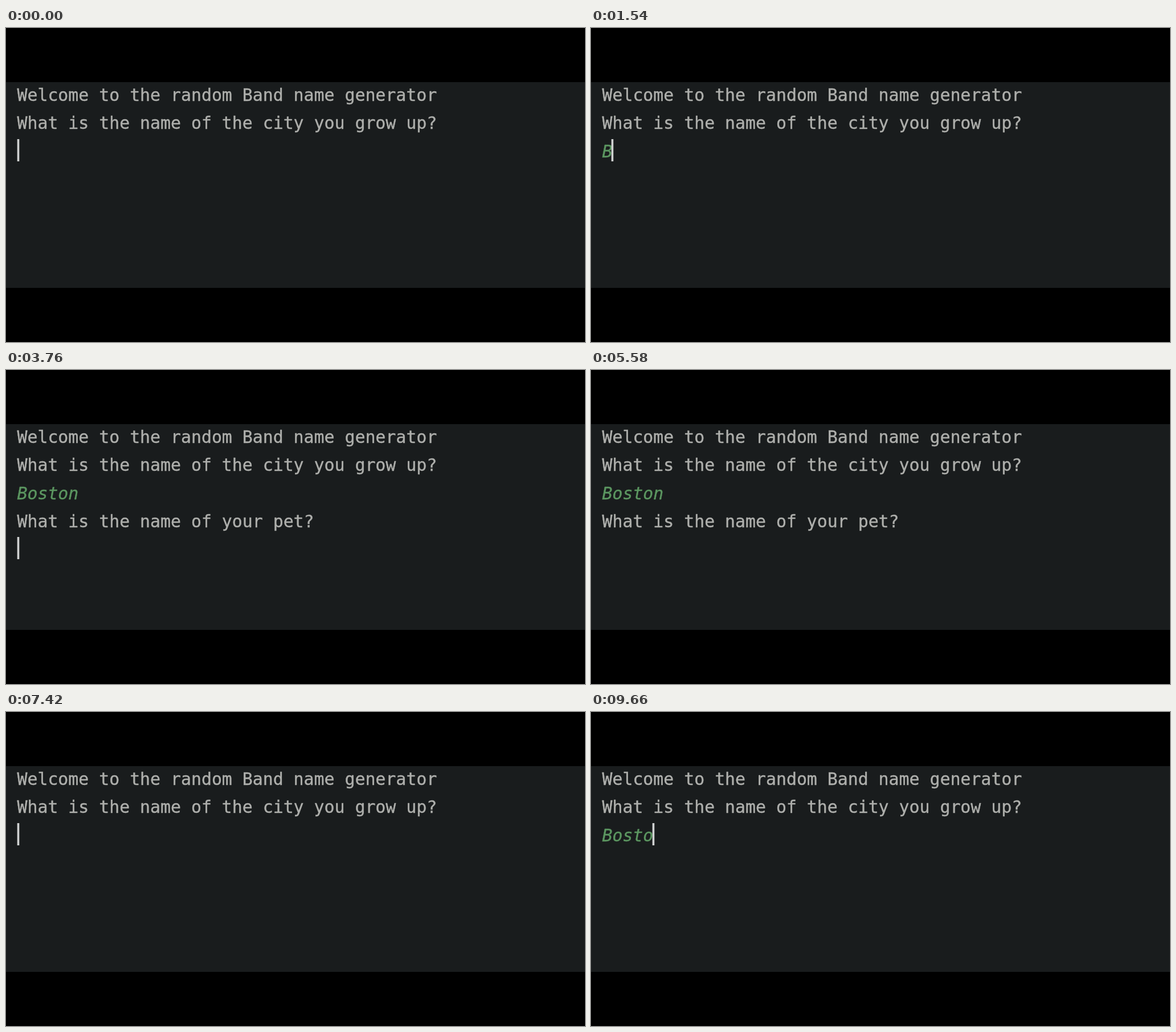
Recreate the animation shown at these times as an HTML page with a canvas. Size 1016 by 551 pixels, loop 9.68 s.

```html
<!DOCTYPE html>
<html lang="en">
<head>
<meta charset="utf-8">
<title>Band name generator</title>
<style>
html, body { margin: 0; width: 100%; height: 100%; overflow: hidden; background: #000; }
canvas { display: block; }
</style>
</head>
<body>
<canvas id="stage" width="1016" height="551"></canvas>
<script>
const ctx = document.getElementById('stage').getContext('2d');

const LOOP = 9680;
const RESTART = 6960;   // the session starts over within the loop
const BLINK = 530;
const LEFT = 20, ADVANCE = 18, FIRST_BASELINE = 128, LINE_HEIGHT = 49.3;
const FONT = '29.85px "DejaVu Sans Mono", "Noto Sans Mono", monospace';
const COLORS = { panel: '#191c1d', output: '#aeafac', input: '#5b9660', caret: '#d0d2d2' };

const CITY = 'Boston';
const KEY_TIMES = [1400, 1840, 2140, 2420, 2660, 2900];
const ENTER = 3560;

function writeLine(text, row, typed = false) {
  const y = Math.round(FIRST_BASELINE + row * LINE_HEIGHT);
  ctx.font = (typed ? 'italic ' : '') + FONT;
  ctx.fillStyle = ctx.strokeStyle = typed ? COLORS.input : COLORS.output;
  ctx.lineWidth = 0.4;
  ctx.lineJoin = 'round';
  ctx.fillText(text, LEFT - 0.5, y);
  ctx.strokeText(text, LEFT - 0.5, y);
}

function drawCaret(column, row, idle) {
  if (Math.floor(idle / BLINK) % 2) return;
  const x = Math.max(LEFT, LEFT - 2 + column * ADVANCE) - 0.3;
  ctx.fillStyle = COLORS.caret;
  ctx.fillRect(x, Math.round(96 + row * LINE_HEIGHT), 3.6, 39);
}

function draw(time) {
  const t = time < RESTART ? time : time - RESTART;
  const typed = KEY_TIMES.filter(key => key <= t).length;

  ctx.fillStyle = '#000';
  ctx.fillRect(0, 0, 1016, 551);
  ctx.fillStyle = COLORS.panel;
  ctx.fillRect(0, 95, 1016, 361);

  writeLine('Welcome to the random Band name generator', 0);
  writeLine('What is the name of the city you grow up?', 1);
  writeLine(CITY.slice(0, typed), 2, true);

  if (t >= ENTER) {
    writeLine('What is the name of your pet?', 3);
    drawCaret(0, 4, t - ENTER);
  } else {
    drawCaret(typed, 2, t - (typed ? KEY_TIMES[typed - 1] : 0));
  }
}

const start = performance.now();
function tick() {
  draw((performance.now() - start) % LOOP);
  requestAnimationFrame(tick);
}
tick();
</script>
</body>
</html>
```
